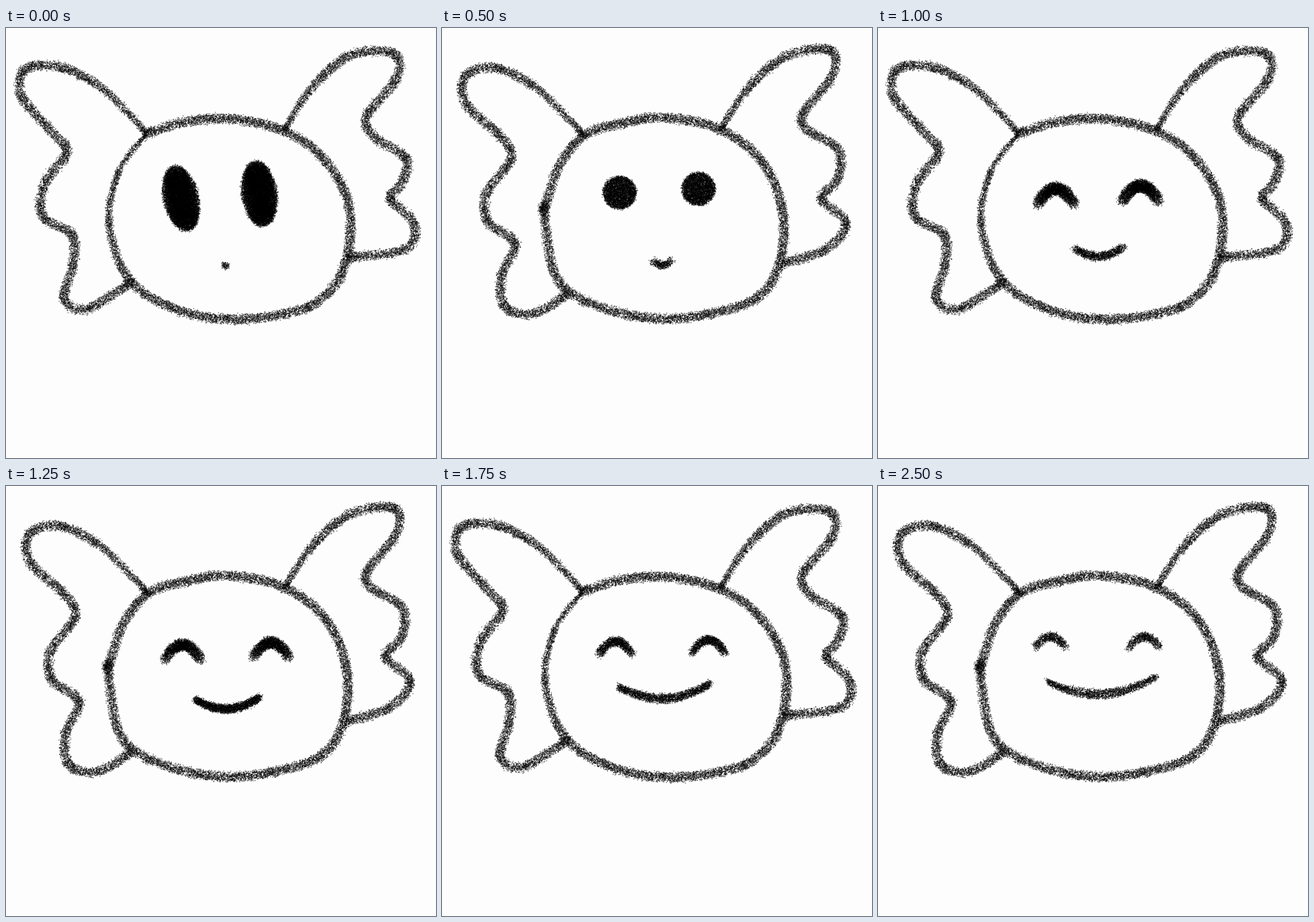
An HTML page with a canvas that plays this animation: 560x560 px, repeating every 10000 ms.

```html
<!DOCTYPE html>
<html lang="en">
<head>
<meta charset="utf-8">
<title>Smiling axolotl</title>
<style>
html, body { margin: 0; width: 100%; height: 100%; overflow: hidden; background: #fdfdfd; }
canvas { display: block; width: 560px; height: 560px; }
</style>
</head>
<body>
<canvas id="stage" width="560" height="560"></canvas>
<script>
const SIZE = 560, LOOP = 10000, LAST = 30, DOT = 1.15, LINE = 7.3;
const CHARCOAL = 'rgba(0, 0, 0, 0.66)';
const stage = document.getElementById('stage').getContext('2d');

const clamp = v => Math.min(1, Math.max(0, v));
const ease = v => clamp(v) ** 2 * (3 - 2 * clamp(v));

function seeded(seed) {
  return () => {
    seed = (seed + 0x6D2B79F5) | 0;
    let v = Math.imul(seed ^ (seed >>> 15), 1 | seed);
    v = (v + Math.imul(v ^ (v >>> 7), 61 | v)) ^ v;
    return ((v ^ (v >>> 14)) >>> 0) / 4294967296;
  };
}

// One charcoal grain near (x, y), within a soft-edged disc.
function grain(ctx, rand, x, y, half) {
  const r = Math.max(0, half - 1) * Math.sqrt(rand());
  const a = rand() * Math.PI * 2;
  const fuzz = () => (rand() + rand() - 1) * 2.5;
  ctx.fillRect(x + r * Math.cos(a) + fuzz() - DOT / 2, y + r * Math.sin(a) + fuzz() - DOT / 2, DOT, DOT);
}

function spline(p0, p1, p2, p3, t) {
  return 0.5 * (2 * p1 + (p2 - p0) * t + (2 * p0 - 5 * p1 + 4 * p2 - p3) * t * t
    + (3 * p1 - p0 - 3 * p2 + p3) * t * t * t);
}

// Charcoal line through flat x,y points; press(t) scales its width.
function line(ctx, rand, pts, press) {
  const count = pts.length / 2;
  const at = (i, axis) => pts[2 * Math.min(count - 1, Math.max(0, i)) + axis];
  for (let i = 0; i < count - 1; i++) {
    const length = Math.hypot(at(i + 1, 0) - at(i, 0), at(i + 1, 1) - at(i, 1));
    const total = length * LINE * press((i + 0.5) / (count - 1)) * 1.75;
    for (let k = 0; k < total; k++) {
      const t = rand();
      const pos = axis => spline(at(i - 1, axis), at(i, axis), at(i + 1, axis), at(i + 2, axis), t);
      grain(ctx, rand, pos(0), pos(1), LINE * press((i + t) / (count - 1)));
    }
  }
}

const thinStart = t => Math.min(1, 0.65 + t * 3);
const thinEnd = t => 1 - Math.max(0, t - 0.75) * 1.8;
const even = () => 1;

function drawBody(seed, leftEar, rightEar, head, headPress) {
  const canvas = document.createElement('canvas');
  canvas.width = canvas.height = SIZE;
  const ctx = canvas.getContext('2d'), rand = seeded(seed);
  ctx.fillStyle = CHARCOAL;
  line(ctx, rand, leftEar, thinStart);
  line(ctx, rand, rightEar, thinStart);
  line(ctx, rand, head, headPress);
  return canvas;
}

const bodies = [
  drawBody(11,
    [183,137, 125,78, 70,51, 26,53, 20,88, 62,138, 79,162, 50,203, 48,246, 85,268,
      88,305, 76,352, 105,366, 164,330],
    [362,133, 400,76, 450,35, 506,34, 508,66, 470,115, 480,142, 521,170, 515,203,
      500,222, 531,254, 520,288, 446,299],
    [183,138, 230,123, 285,118, 345,128, 395,153, 435,200, 449,255, 437,320, 400,360,
      335,377, 265,377, 200,357, 155,320, 134,250, 148,185, 183,138], thinEnd),
  drawBody(23,
    [185,140, 125,80, 70,52, 30,63, 32,100, 75,140, 90,170, 58,215, 60,253, 95,280,
      78,322, 82,363, 120,372, 164,346],
    [362,133, 400,77, 450,36, 506,29, 508,62, 470,112, 476,133, 516,158, 515,198,
      494,222, 526,254, 500,288, 442,307],
    [133,238, 152,181, 185,140, 235,124, 290,117, 360,131, 415,172, 443,235, 440,305,
      412,350, 350,372, 270,378, 185,355, 146,318, 132,231], even)
];

// Parabolic smear centred on (x, y): reaches dx, dy to each end, whose level is offset by bend.
function arc(rand, { x, y, dx, dy, bend, half, ink, taper }) {
  const area = 4 * half * Math.hypot(dx, dy, bend) * (1 - taper / 3) + Math.PI * half * half;
  for (let i = 0; i < area * ink; i++) {
    const t = rand() * 2 - 1;
    grain(stage, rand, x + dx * t, y + dy * t + bend * t * t, half * (1 - taper * t * t));
  }
}

// Eyes: tall ovals shrink to discs, then squeeze into smiling arcs.
function eye(p, x, y, lean) {
  const tall = 1 - clamp(p / 0.2);
  const squint = ease((p - 0.2) / 0.2);
  return {
    x, y,
    dx: lean * tall + (26 - 6 * p) * squint,
    dy: 31 * tall,
    bend: (24 - 9 * p) * squint,
    half: 6.8 + 12 * (1 - squint) + 8 * Math.max(0, 0.7 - p),
    ink: 3.3 - 2.1 * p,
    taper: 0.1 + 0.35 * tall
  };
}

// Mouth: a dot that widens and rises into a grin.
function mouth(p) {
  const open = Math.sin(p * Math.PI / 2);
  const ends = 310 - 59 * ease(p * 1.1);
  return {
    x: 286 + 5 * p, y: ends + 20 * open,
    dx: 71 * open ** 1.5, dy: -3 * p,
    bend: -20 * open,
    half: 5.6 + 1.8 * open,
    ink: 1.2 + 1.4 * Math.exp(-(((p - 0.55) / 0.13) ** 2)),
    taper: 0.4 * p
  };
}

function drawFace(index) {
  const rand = seeded(100 + index), p = index / LAST;
  const lid = 216 - 20 * p ** 0.7;
  stage.fillStyle = CHARCOAL;
  arc(rand, eye(p, 228 + 4 * Math.sin(5.2 * p), lid + 6 * (1 - p), 7));
  arc(rand, eye(p, 330 + 17 * ease(p * 1.6), lid, 4));
  arc(rand, mouth(p));
}

// Twelve drawings a second, on a 10 ms clock; the one before the last is held.
function indexAt(time) {
  const ticks = Math.floor(time / 10) + 1;
  const index = Math.min(LAST, Math.ceil(ticks * 12 / 100) - 1);
  return index === LAST - 1 ? LAST - 2 : index;
}

let shown = -1;
function render(time) {
  const index = indexAt(time % LOOP);
  if (index === shown) return;
  shown = index;
  stage.fillStyle = '#fdfdfd';
  stage.fillRect(0, 0, SIZE, SIZE);
  stage.drawImage(bodies[index % 4 < 2 ? 0 : 1], 0, 0);
  drawFace(index);
}

const start = performance.now();
function tick() {
  render(performance.now() - start);
  requestAnimationFrame(tick);
}
tick();
</script>
</body>
</html>
```
